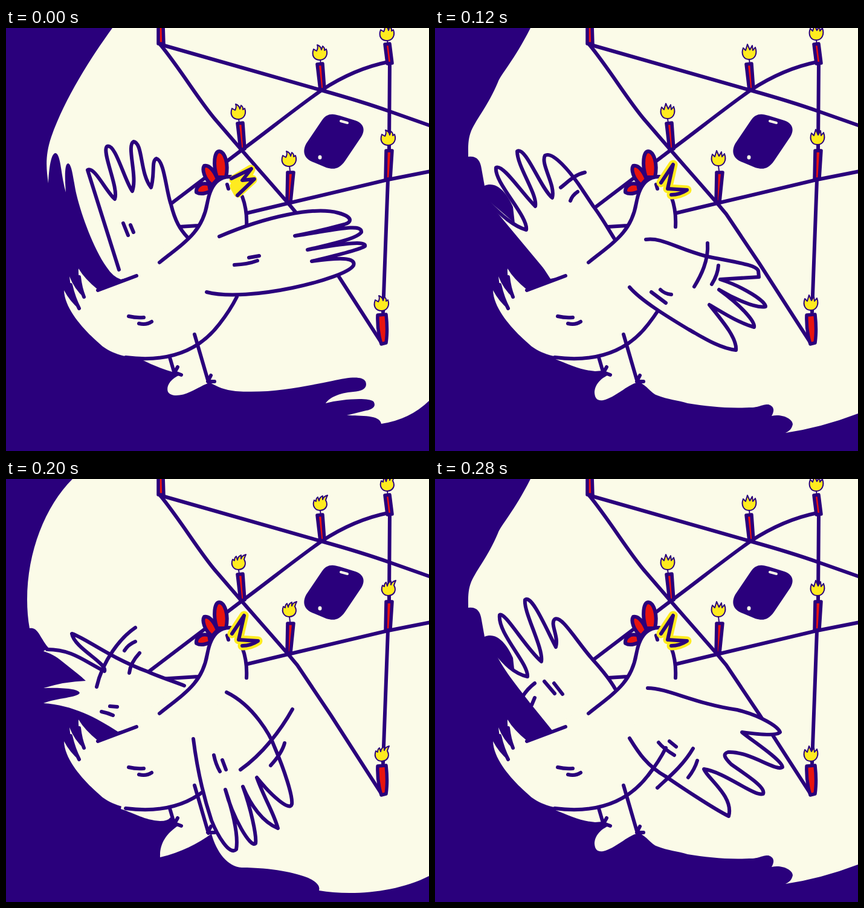
Animation of 700 by 700 pixels, one loop 0.36 s. Source, as an HTML page:

```html
<!DOCTYPE html>
<html lang="en">
<head>
<meta charset="utf-8">
<title>Summoning hen</title>
<style>
  html, body { margin: 0; width: 100%; height: 100%; overflow: hidden; background: #2a007c; }
  svg { display: block; width: 100%; height: 100%; }
  .line { fill: none; stroke: #2a007c; stroke-width: 6; stroke-linecap: round; stroke-linejoin: round; }
  .cream { fill: #fbfbe8; }
  .red { fill: #e8140f; }
  .flame { fill: #ffeb1f; stroke-width: 2; }
  .glow { stroke: #ffeb1f; stroke-width: 15; }
</style>
</head>
<body>
<svg viewBox="0 0 700 700">
  <path id="light" class="cream"/>

  <g class="line">
    <path d="M255 27L522 103Q590 122 635 138L703 162"/>
    <path d="M255 27C290 70 318 118 346 151L390 202L467 290L482 308L537 390L622 522"/>
    <path d="M633 56C598 63 560 78 522 103C470 140 430 173 390 202L220 331"/>
    <path d="M703 237L632 251L467 290L400 306L318 327L220 333"/>
    <path d="M635 58L634 200L632 251C630 320 627 390 624 470"/>
  </g>
  <g id="candles"></g>

  <path d="M522 154C530 141 540 141 552 145L578 153C592 158 595 168 588 180L561 220C552 233 543 235 530 231L506 221C493 215 490 204 497 191Z" fill="#2a007c"/>
  <path d="M554 154L565 157" class="line" style="stroke:#fbfbe8;stroke-width:4"/>
  <ellipse cx="519.5" cy="214" rx="3" ry="3.5" class="cream"/>

  <path id="leftWing" class="line cream"/>
  <path id="leftMarks" class="line"/>

  <!-- comb, then body and head -->
  <g class="line red">
    <path d="M336 259C322 254 314 264 315 272C322 276 330 274 338 270Z"/>
    <path d="M341 260C328 250 324 234 328 228C337 226 345 238 350 250Z"/>
    <path d="M349 247C342 225 345 204 353 204C362 205 369 224 364 247Z"/>
  </g>
  <path class="cream" d="M217 410L152 433Q130 415 120 398Q119 424 129 446Q113 432 105 411Q107 440 121 465Q106 453 96 434C97 470 140 510 160 527C185 545 220 550 270 546C320 535 355 490 382 445L398 329Q399 300 391 279L372 246C350 245 338 262 333 290C325 335 300 352 254 388Z"/>
  <g class="line">
    <path d="M121 412Q123 430 129 445M107 425Q112 447 121 464"/>
    <path d="M152 434L216 410M254 388C298 353 325 337 333 290C338 262 350 245 372 246M391 279C397 295 399 310 398 329"/>
    <path d="M366 259L368 266"/>
    <path d="M203 477Q215 480 228 479M220 489Q232 492 241 486"/>
    <path d="M198 545C260 553 315 540 353 490Q371 467 382 445"/>
    <path d="M271 545L278 569M284 561L279 570L290 574M312 507L335 586M339 575L334 585L345 585"/>
  </g>
  <path id="beakGlow" class="line glow"/>
  <path id="beak" class="line"/>

  <path id="rightWing" class="line cream"/>
  <path id="rightMarks" class="line"/>
</svg>
<script>
const LOOP = 360;
const byId = id => document.getElementById(id);

// Each candle: wax outline, then the middle of its flame.
const candles = [
  ["M252 -6L260 -6L261 26L252 26Z", 255, -40],
  ["M383 158L392 157L395 200L388 201Z", 385, 138],
  ["M515 60L524 59L527 101L520 103Z", 520, 40],
  ["M466 239L476 239L471 288L465 288Z", 469, 216],
  ["M627 27L635 26L639 58L631 59Z", 631, 8],
  ["M629 203L639 203L636 250L628 250Z", 633, 181],
  ["M615 475L629 474Q632 500 629 521L621 523Q614 500 615 475Z", 622, 455]
];
byId("candles").innerHTML = candles.map(([wax, x, y]) => `
  <path class="line" style="stroke-width:2" d="M${x} ${y + 12}L${x + 1} ${y + 20}"/>
  <path class="line red" style="stroke-width:5.5" d="${wax}"/>
  <path class="line flame" transform="translate(${x} ${y})"/>`).join("");
const flames = document.querySelectorAll(".flame");

const openBeak = "M374 256L394 226L385 266L417 268Q405 276 391 276";
const middle = {
  light: "M158 0C130 55 110 75 104 90C87 130 70 148 60 170C54 185 55 198 55 213C69 211 75 219 77 233L82 261C101 253 118 271 129 296L132 323L90 287C105 312 140 340 165 375L191 415L217 410L197 547C222 557 240 566 265 568L278 567L290 573C272 580 264 592 264 604C265 616 272 618 282 615C303 608 321 588 338 586C350 591 358 605 368 608C385 615 402 616 418 621C450 626 485 630 520 628C538 628 542 622 552 623C563 627 561 635 557 642C573 638 592 646 592 656C590 664 586 667 580 670Q640 661 700 638V0Z",
  flame: "M-10 -7C-14 4 -9 12 0 12C9 12 14 3 10 -8L6 -3L5 -11L1 -4L-3 -13L-6 -3Z",
  beak: openBeak
};

const poses = [
  {
    until: 120,
    light: "M176 0C140 50 98 115 75 180C64 212 67 235 70 257C71 235 74 207 82 207C91 209 91 245 99 272C97 245 97 224 103 224C110 226 112 258 117 277C125 310 145 365 166 395Q177 412 190 416L217 410L225 549Q250 562 275 569L288 574C270 582 265 594 268 602C273 611 291 609 305 602C317 597 328 589 338 587C350 594 362 599 380 601C440 605 490 594 540 584C570 577 590 576 595 585C599 596 590 601 575 602C550 604 535 612 529 621C555 614 600 611 608 618C613 625 608 631 596 633L564 641C588 642 619 640 621 655Q668 648 700 617V0Z",
    flame: "M-10 -6C-14 5 -9 12 1 12C11 11 14 2 11 -6L8 -4Q9 -8 5 -11L3 -5Q2 -11 -4 -13Q-2 -8 -5 -3Z",
    flameShift: "-1 1",
    beak: "M373 249L406 233L391 252L411 250L383 277",
    glow: "M377 251L405 234L397 249L408 251L384 273L378 262L397 247",
    leftWing: "M187 400L135 235C146 228 165 270 180 283C187 265 158 205 167 196C181 190 195 250 209 270C218 245 199 195 211 188C227 190 221 240 240 264C247 240 240 220 249 216C262 220 265 270 273 292C280 320 288 333 300 346",
    leftMarks: "M194 323L202 343M206 326L211 338",
    rightWing: "M353 345C430 312 510 295 550 306C575 313 572 321 560 325Q520 336 478 344C540 335 590 322 588 338C580 349 540 357 499 367C560 356 597 352 594 361C585 367 540 378 506 386C550 380 580 379 575 393C562 415 400 455 332 437",
    rightMarks: "M402 380L419 377M378 392Q400 391 416 385"
  },
  {
    ...middle,
    until: 200,
    leftWing: "M90 290C110 310 130 328 151 334C155 312 97 255 101 231C112 224 145 275 166 295C170 275 136 230 136 204C150 195 175 266 194 281C200 260 174 225 182 211C195 203 225 240 240 262L262 295C275 312 285 330 297 349L190 410",
    leftMarks: "M248 239C230 243 220 255 208 264M236 271Q227 277 224 286",
    rightWing: "M349 350C375 346 400 365 450 378C500 388 532 392 535 402L536 412L472 416C510 428 547 452 547 461C530 465 490 445 470 433C510 462 530 487 528 495C500 487 475 470 454 458C480 490 500 515 498 533C470 530 440 510 420 499C380 475 340 450 322 429",
    rightMarks: "M451 356C453 385 440 410 429 428M469 393Q468 408 458 424M373 433Q380 440 391 441M358 437L382 455"
  },
  {
    until: 280,
    light: "M110 0C65 45 35 120 35 200Q35 225 39 247C53 244 56 263 70 279L62 285C82 290 110 312 132 334Q98 335 62 346C85 345 120 346 122 354C118 362 85 362 62 371C110 374 150 395 185 418L217 410L190 546C215 554 228 564 255 566Q268 566 272 560L286 573C264 587 254 605 255 626C290 618 318 603 340 587C348 617 367 642 390 643C440 643 480 652 500 660C515 667 520 674 518 681C570 690 645 685 700 657V0Z",
    flame: "M-10 -5C-14 5 -8 12 0 12C11 11 13 2 9 -5Q10 -9 12 -13Q5 -11 4 -6L4 -12Q-1 -10 -2 -4L-4 -10Q-7 -8 -7 -3Z",
    beak: openBeak,
    leftWing: "M68 282C110 282 130 302 163 318C168 305 113 280 109 256C130 262 170 295 235 319C255 328 280 336 295 342L185 412L130 380L132 333Z",
    leftStroke: "M68 282C110 282 130 302 163 318C168 305 113 280 109 256C130 262 170 295 235 319C255 328 280 336 295 342",
    leftMarks: "M214 246C190 262 160 300 150 344M214 269Q202 274 196 284M221 288Q206 304 204 321M158 385Q168 387 177 391M172 376L184 377",
    rightWing: "M365 353C410 375 438 425 445 445C460 480 475 525 473 538C470 551 440 525 415 494C428 530 442 550 450 578C425 568 405 540 392 509C405 545 415 590 413 603C405 612 375 560 363 514C375 550 385 590 381 613C370 624 350 590 340 565C325 520 315 470 310 430",
    rightMarks: "M474 381C455 415 425 455 388 481M461 437Q457 453 438 474M344 457Q347 472 354 484M358 465L364 481"
  },
  {
    ...middle,
    until: LOOP,
    light: middle.light.replace("L90 287C105 312 140 340 165 375L191 415", "L98 282C108 310 140 348 160 374L194 416"),
    leftWing: "M98 284C115 305 130 322 153 327C155 305 103 255 107 225C115 218 150 280 176 302C180 280 146 220 149 200C160 190 185 250 200 278C205 260 190 240 198 232C210 225 235 270 262 300C280 320 290 333 298 347L193 412",
    leftMarks: "M165 338Q153 347 145 360M165 362L160 374M181 335L198 355M197 338L211 356",
    rightWing: "M352 346C385 346 430 372 500 382C540 392 568 410 571 419C565 426 530 422 508 419C520 430 575 465 575 477C565 485 520 450 485 452C475 455 480 462 490 472C515 490 548 510 543 521C530 527 480 485 445 480C450 495 495 525 486 558C460 545 400 505 383 493C350 475 335 450 322 429",
    rightMarks: "M427 446C410 475 385 495 368 511M434 466Q430 480 419 494M388 434L399 443M370 436Q378 446 396 457M353 490Q371 467 382 445"
  }
];

// The left wing's fill may close past the visible outline, so they are separate paths.
const leftOutline = byId("leftWing").cloneNode();
leftOutline.id = "leftOutline";
leftOutline.setAttribute("class", "line");
byId("leftWing").after(leftOutline);
byId("leftWing").setAttribute("class", "cream");

function show(pose) {
  const set = (id, d) => byId(id).setAttribute("d", d);
  for (const id of ["light", "beak", "leftWing", "leftMarks", "rightWing", "rightMarks"]) set(id, pose[id]);
  set("leftOutline", pose.leftStroke || pose.leftWing.replace(/L19\d 41\d$/, ""));
  set("beakGlow", pose.glow || pose.beak);
  flames.forEach((flame, i) => {
    const [, x, y] = candles[i];
    flame.setAttribute("d", pose.flame);
    flame.setAttribute("transform", `translate(${x} ${y}) translate(${pose.flameShift || "0 0"})`);
  });
}

let current;
function tick() {
  const time = performance.now() % LOOP;
  const pose = poses.find(p => time < p.until);
  if (pose !== current) show(current = pose);
  requestAnimationFrame(tick);
}
tick();
</script>
</body>
</html>
```
